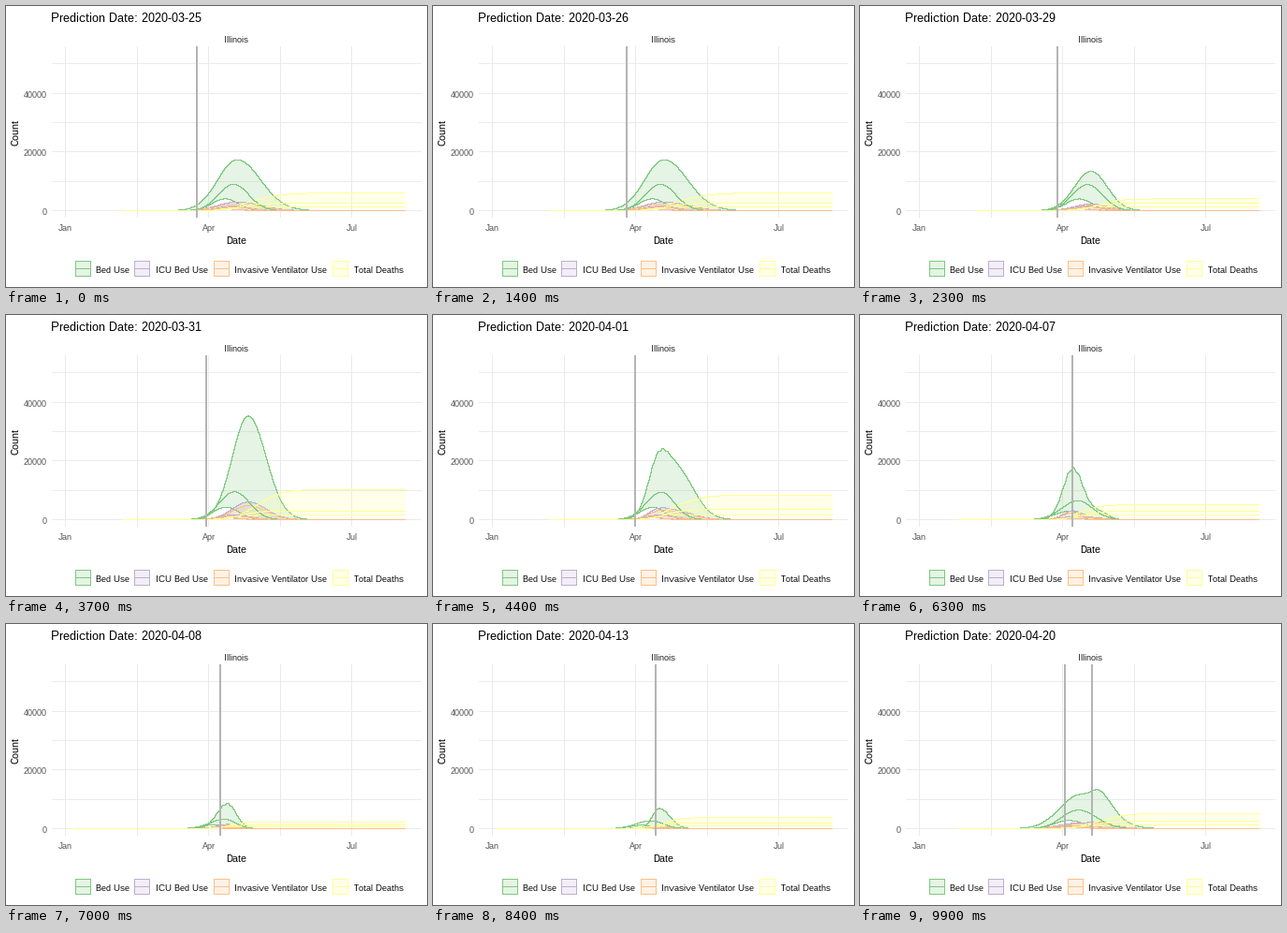
A matplotlib script for the animation above (10000 ms loop, 450 px wide and 300 px high).

```python
import math

import matplotlib.pyplot as plt
import numpy as np
from matplotlib.animation import FuncAnimation
from matplotlib.patches import Polygon, Rectangle

W, H, DPI = 450, 300, 100
PX = 72 / DPI
N = 217
BASE, PER_UNIT = 218, 0.003132
JAN, PER_DAY, END = 62.9, 1.6813, 426
COLORS = {
    "Bed Use": "#7FC97F",
    "ICU Bed Use": "#BEAED4",
    "Invasive Ventilator Use": "#FDC086",
    "Total Deaths": "#FFFF99",
}

plt.rcParams.update({
    "font.family": "Liberation Sans",
    "text.hinting": "native",
    "text.hinting_factor": 1,
    "path.simplify": False,
})


def bump(x, height, peak, left, right):
    z = (x - peak) / np.where(x < peak, left, right)
    return height * np.exp(-0.5 * z * z)


def deaths(x, total, peak, left, right):
    """Running total that follows a bed curve with a short lag."""
    daily = bump(x, 1, peak + 0.35 * right, left, 1.2 * right)
    return total * np.cumsum(daily) / daily.sum()


def model(high, peak, left, right, mean, high_deaths, mean_deaths,
          start=124, wobble=0.0):
    """Return x and the values as [series, upper/mean/lower, point]."""
    x = np.linspace(start, END, N)
    mean_peak = 228 + 0.0016 * mean
    mean_right = min(16, 1.2 * right)
    shapes = [(peak, left, right), (mean_peak, 16, mean_right),
              (mean_peak - 9, 14, 0.85 * mean_right)]
    beds = np.array([bump(x, h, *s) for h, s in zip((high, mean, 0.45 * mean), shapes)])
    beds[0] *= 1 + wobble * np.sin((x - peak) * 1.1 + 1)
    totals = (high_deaths, mean_deaths, 0.5 * mean_deaths)
    dead = np.array([deaths(x, d, *s) for d, s in zip(totals, shapes)])
    return x, np.array([beds, 0.17 * beds, 0.135 * beds, dead])


def mix(a, b, t):
    return tuple(p + (q - p) * t for p, q in zip(a, b))


def scaled(state, k):
    return state[0], state[1] * k


march = model(17400, 246, 20.5, 25, 9000, 6000, 2500)
late_march = model(13400, 246, 17.7, 17.3, 8900, 4000, 2700)
month_end = model(35300, 258, 17, 19, 9500, 10200, 3000)
april = model(26200, 238.5, 10, 10.5, 9300, 6500, 3800, wobble=0.03)
second_week = model(8500, 235.5, 11, 9.5, 3200, 2200, 1300, start=67, wobble=0.03)
mid_april = model(6900, 241, 7.5, 11, 2700, 3700, 2000, start=67)
late_april = model(13500, 236, 9, 14.5, 3200, 3600, 2500, start=67)

# Day of the year and forecast for every release
STATES = [
    (84, march), (85, march), (86, march),
    (88, late_march), (89, mix(late_march, month_end, 0.5)),
    (90, month_end), (91, mix(month_end, april, 0.5)),
    (95, april), (97, april),
    (98, scaled(second_week, 0.9)), (100, scaled(second_week, 1.2)),
    (103, scaled(mid_april, 0.9)), (106, scaled(mid_april, 1.2)),
    (110, late_april),
]
# First frame and length of each move
MOVES = [(4, 3), (13, 3), (20, 4)] + [(s, 3) for s in range(28, 99, 7)]


def pose(frame):
    """Return the current state's index and the progress to the next one."""
    current = 0
    for k, (start, steps) in enumerate(MOVES):
        if frame < start:
            break
        done = frame - start + 1
        if done < steps:
            return k, done / steps
        current = (k + 1) % len(STATES)
    return current, 0.0


def date_text(day):
    month, dom = (3, day - 59) if day < 91 else (4, day - 90)
    return f"Prediction Date: 2020-{month:02d}-{dom:02d}"


fig = plt.figure(figsize=(W / DPI, H / DPI), dpi=DPI, facecolor="white")
ax = fig.add_axes([0, 0, 1, 1])
ax.set_xlim(-0.5, W - 0.5)
ax.set_ylim(H - 0.5, -0.5)
ax.axis("off")


def text(x, y, s, size, color="black", ha="left", **kw):
    kw.setdefault("va", "baseline")
    return ax.text(x, y, s, fontsize=size * PX, color=color, ha=ha, **kw)


def line(xs, ys, color, z):
    # A thin hard-edged stroke through pixel centres fills exactly one pixel.
    return ax.plot(xs, ys, color=color, lw=0.4 * PX, antialiased=False, snap=False,
                   drawstyle="steps-post", zorder=z)[0]


def box(x, y, w, h, color, z):
    patch = Rectangle((x - 0.5, y - 0.5), w, h, facecolor=color, lw=0,
                      antialiased=False, zorder=z)
    return ax.add_patch(patch)


# Grid and axes
for gx in (63, 140, 216, 293, 369):
    box(gx, 43, 1, 183, "#EBEBEB", 0)
for count in range(0, 50001, 10000):
    gy = round(BASE - count * PER_UNIT)
    box(49, gy, 395, 1, "#EBEBEB", 0)
    if count % 20000 == 0:
        text(43.5, gy + 4.5, str(count), 9, "#4D4D4D", "right")
for gx, name in ((63, "Jan"), (216, "Apr"), (369, "Jul")):
    text(gx, 239.5, name, 9, "#4D4D4D", "center")
text(246, 38.5, "Illinois", 9, "#1A1A1A", "center")
text(245.5, 253.5, "Date", 11, ha="center")
text(10.5, 134.5, "Count", 11, ha="center", va="center", rotation=90)
title = text(47.5, 16.5, "", 13)

# Legend
for kx, (name, color) in zip((74, 137, 222, 349), COLORS.items()):
    box(kx, 272, 17, 17, (color, 0.2), 1)
    line([kx, kx + 16, kx + 16, kx, kx], [272, 272, 288, 288, 272], color, 2)
    line([kx, kx + 16], [280, 280], color, 2)
    text(kx + 22, 284.5, name, 9)

# Moving parts
ribbons, curves = [], []
for i, color in enumerate(COLORS.values()):
    ribbon = Polygon(np.zeros((3, 2)), facecolor=(color, 0.2), lw=0, antialiased=False,
                     zorder=3 + i * 0.1)
    ribbons.append(ax.add_patch(ribbon))
    curves.append([line([], [], color, z + i * 0.1) for z in (3.05, 4, 3.05)])
marker = box(0, 43, 2, 183, "#B4B4B4", 6)
leaving = box(0, 43, 2, 183, "#B4B4B4", 6)


def place(mark, day):
    mark.set_x(math.floor(JAN + day * PER_DAY + 0.5) - 1.5)


def update(frame):
    k, t = pose(frame)
    day, now = STATES[k]
    next_day, then = STATES[(k + 1) % len(STATES)]
    x, y = mix(now, then, t)
    cols = np.arange(math.ceil(x[0]), END + 1)
    for ribbon, trio, values in zip(ribbons, curves, y):
        rows = [np.round(BASE - np.interp(cols, x, v) * PER_UNIT) for v in values]
        ribbon.set_xy(np.column_stack([np.r_[cols, cols[::-1]],
                                       np.r_[rows[0], rows[2][::-1]]]))
        for curve, row in zip(trio, rows):
            curve.set_data(cols, row)
    place(marker, day + (next_day - day) * t)
    place(leaving, day)
    leaving.set_visible(t > 0 and next_day < day)
    title.set_text(date_text(day))
    return [title, marker, leaving, *ribbons, *sum(curves, [])]


anim = FuncAnimation(fig, update, frames=100, interval=100, repeat=True,
                     repeat_delay=0, blit=False)
plt.show()
```
